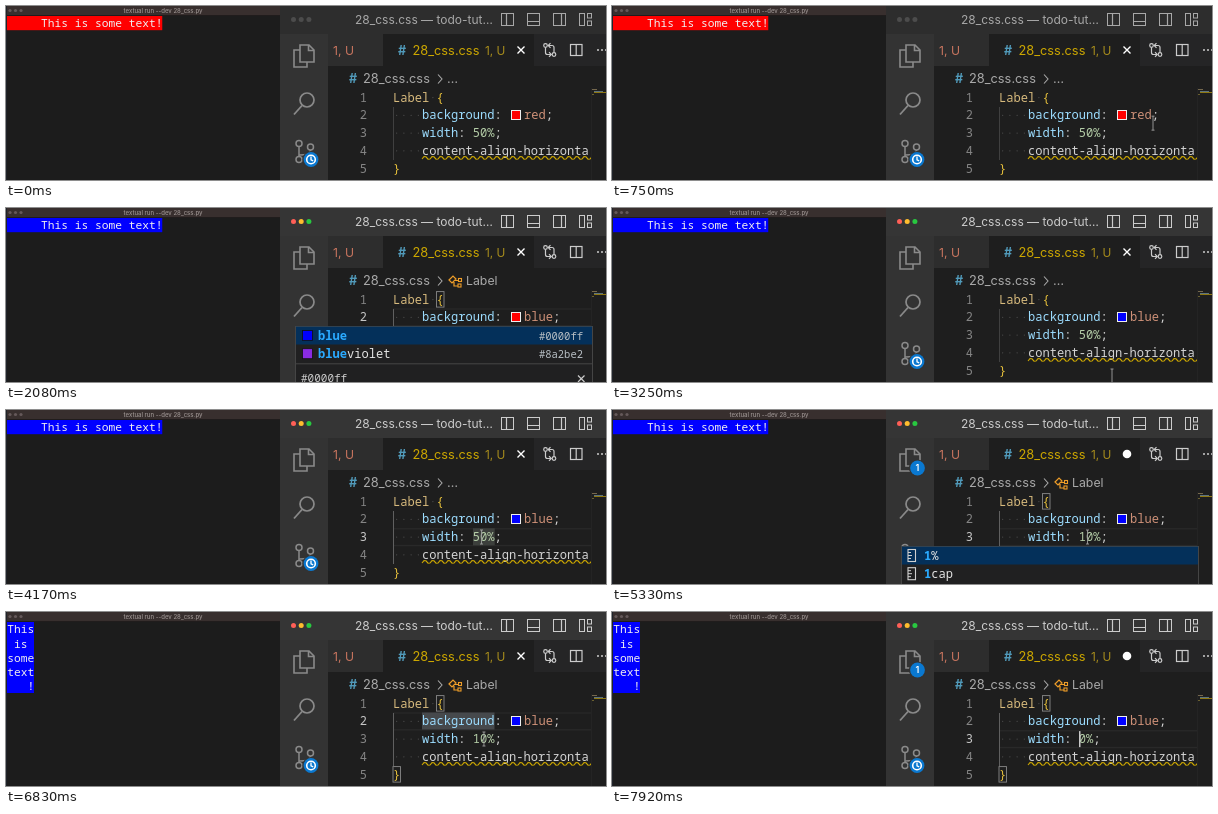
An HTML page with a canvas for the animation above (8 s loop, 600x174 px).

```html
<!DOCTYPE html>
<html lang="en">
<head>
<meta charset="utf-8">
<title>Live CSS editing</title>
<style>
html, body { margin: 0; width: 100%; height: 100%; overflow: hidden; background: #1c1c1c; }
canvas { display: block; width: 600px; height: 174px; }
</style>
</head>
<body>
<canvas id="stage"></canvas>
<script>
const LOOP = 8000, W = 600, H = 174;
const MONO = '"Noto Sans Mono", "DejaVu Sans Mono", monospace';
const SANS = 'Inter, "Open Sans", sans-serif';
const CHAR = 7.25, CODE_SIZE = 12.08, CODE_X = 387;
const CELL = 6.75, CELL_SIZE = 11.25, ROW = 14.2;
const stage = document.getElementById('stage');
const dpr = window.devicePixelRatio || 1;
stage.width = W * dpr;
stage.height = H * dpr;
const c = stage.getContext('2d');
c.scale(dpr, dpr);

function rect(x, y, w, h, fill) {
  c.fillStyle = fill;
  c.fillRect(x, y, w, h);
}
function frame(x, y, w, h, color, width = 1) {
  c.strokeStyle = color;
  c.lineWidth = width;
  c.strokeRect(x, y, w, h);
}
function disc(x, y, r, fill) {
  c.fillStyle = fill;
  c.beginPath();
  c.arc(x, y, r, 0, Math.PI * 2);
  c.fill();
}
function ring(x, y, r, color, width = 1.4) {
  c.strokeStyle = color;
  c.lineWidth = width;
  c.beginPath();
  c.arc(x, y, r, 0, Math.PI * 2);
  c.stroke();
}
function path(d, color, width = 1.2) {
  c.strokeStyle = color;
  c.lineWidth = width;
  c.stroke(new Path2D(d));
}
function text(s, x, y, size, color, family = SANS, weight = 400, align = 'left') {
  c.font = `${weight} ${size}px ${family}`;
  c.textAlign = align;
  c.fillStyle = color;
  c.fillText(s, x, y);
}
// Monospaced runs: text, colour, weight.
function runs(x, y, parts) {
  for (const [s, color, weight] of parts) {
    text(s, x, y, CODE_SIZE, color, MONO, weight);
    x += s.length * CHAR;
  }
}
const lineY = n => 95.6 + (n - 1) * 17.75;
const within = (t, a, b) => t >= a && t < b;
const latest = (t, steps) => steps.reduce((v, [at, next]) => t >= at ? next : v, null);

function stateAt(t) {
  return {
    focused: t >= 920,
    value: latest(t, [[0, 'red'], [1500, 'b'], [1590, 'bl'], [1670, 'blu'], [1750, 'blue']]),
    swatch: t < 2330 ? '#ff0000' : '#0000ff',
    width: latest(t, [[0, '50%'], [4750, '0%'], [5080, '10%'], [7750, '0%']]),
    label: t < 2000 ? '#ff0000' : '#0000ff',
    narrow: t >= 5920,
    dirty: within(t, 1500, 1920) || within(t, 4750, 5750) || t >= 7750,
    line: latest(t, [[0, 0], [1000, 2], [2750, 0], [4080, 3], [6330, 2], [7330, 3]]),
    crumb: within(t, 1080, 2920) || t >= 4250,
    braces: within(t, 1500, 2750) || t >= 4250,
    popup: within(t, 1580, 2580) ? 'color' : within(t, 5160, 6170) ? 'unit' : '',
    selected: within(t, 1080, 1500),
    word: within(t, 6330, 7330) ? 2 : within(t, 4080, 4750) || within(t, 7330, 7750) ? 3 : 0
  };
}

const mousePath = [[250, 541, 170], [900, 541, 109], [1500, 541, 109],
  [2750, 541, 109], [3100, 500, 168], [3500, 500, 168], [3950, 475.5, 127],
  [5900, 475.5, 127], [6250, 455, 109], [6450, 455, 109], [6750, 478, 127], [7750, 475, 127]];
function mouseAt(t) {
  if (t < 250 || within(t, 1500, 2750) || t >= 7750) return null;
  const i = mousePath.findIndex(p => p[0] > t);
  const [t0, x0, y0] = mousePath[i - 1], [t1, x1, y1] = mousePath[i];
  const u = (t - t0) / (t1 - t0), k = u * u * (3 - 2 * u);
  return [x0 + (x1 - x0) * k, y0 + (y1 - y0) * k];
}

function drawTerminal(s) {
  rect(0, 0, 274, H, '#1c1c1c');
  rect(0, 0, 274, 9, '#382f2e');
  rect(0, 9, 274, 1, '#201c1c');
  rect(0, 0, 1, H, '#20242b');
  [4, 9.5, 15].forEach(x => disc(x, 4.5, 1.6, '#65595a'));
  text('textual run --dev 28_css.py', 157, 7, 6, '#9b9290', SANS, 500, 'center');
  const rows = s.narrow ? ['This', ' is', 'some', 'text', '   !'] : ['     This is some text!'];
  rect(1, 10, (s.narrow ? 4 : 23) * CELL, rows.length * ROW, s.label);
  rows.forEach((row, i) => text(row, 1.3, 21.3 + i * ROW, CELL_SIZE, '#f0eef0', MONO));
}

function drawTitleBar(s) {
  rect(274, 0, 326, 28, s.focused ? '#353535' : '#2d2d2d');
  ['#ff5f57', '#febc2e', '#28c840'].forEach((color, i) =>
    disc(287.5 + i * 7.7, 13.5, 2.5, s.focused ? color : '#4c4c4c'));
  const ink = s.focused ? '#cccccc' : '#a8a8a8';
  text('28_css.css — todo-tut…', 349, 18.2, 12, ink);
  [495.5, 521.5, 547.5].forEach(x => frame(x, 7.5, 12, 12, ink));
  path('M500.5 7.5v12 M521.5 15.5h12 M555.5 7.5v12', ink);
  frame(573.5, 7.5, 5, 12, ink);
  frame(581.5, 7.5, 4, 4.5, ink);
  frame(581.5, 15, 4, 4.5, ink);
}

function badge(x, y) {
  disc(x, y, 8.6, '#333333');
  disc(x, y, 7.4, '#0a78d0');
}

function drawActivityBar(s) {
  rect(274, 28, 48, H - 28, '#333333');
  const ink = '#8a8a8a';
  path('M294 39h9l5 5v12h-14z M302.5 39v5.5h5.5 M294 44h-6v17h13v-5', ink, 1.6);
  ring(301, 94, 7, ink, 1.7);
  path('M296 99.5l-8 9', ink, 1.8);
  ring(293, 137.5, 3, ink, 1.5);
  ring(304.5, 141, 3, ink, 1.5);
  ring(293, 153.5, 3, ink, 1.5);
  path('M293 140.5v10 M304.5 144c0 4-4 5-11 5', ink, 1.5);
  badge(305, 153.5);
  ring(305, 153.5, 4.3, '#ffffff', 1.6);
  path('M305 150.5v3.3l2.2 1', '#ffffff', 1.3);
  if (s.dirty) {
    badge(305.5, 58);
    text('1', 305.5, 61.2, 9, '#ffffff', SANS, 600, 'center');
  }
}

function drawTabs(s) {
  rect(322, 28, 278, 32, '#252526');
  rect(322, 28, 55, 32, '#2d2d2d');
  rect(377, 28, 151, 32, '#1e1e1e');
  text('1, U', 327, 48.6, 12.2, '#c8755f');
  text('#', 392, 48.6, 12.5, '#519aba', SANS, 700);
  text('28_css.css', 406.5, 48.6, 12.8, '#cca700');
  text('1, U', 479, 48.6, 11.8, '#a88d1c');
  const ink = '#cccccc';
  if (s.dirty) disc(515, 44, 4.3, '#ffffff');
  else path('M511.5 40.5l7 7 M518.5 40.5l-7 7', '#ffffff', 1.4);
  ring(539.5, 39.5, 1.8, ink, 1.2);
  ring(548, 48.5, 1.8, ink, 1.2);
  path('M539.5 41.5v5q0 2 2 2h3.5 M543 46.2l2.3 2.3-2.3 2.3 M548 46.5v-5q0-2-2-2h-3.5 M544.5 37.2l-2.3 2.3 2.3 2.3', ink);
  frame(564.5, 38.5, 11.5, 11, ink, 1.2);
  path('M570.2 38.5v11', ink);
  [592, 596, 600].forEach(x => disc(x, 44, 1, ink));
}

function drawBreadcrumb(s) {
  const ink = '#a9a9a9';
  text('#', 343, 77.4, 12.5, '#519aba', SANS, 700);
  text('28_css.css', 357, 77.4, 12.8, ink);
  path('M432 68.5l4 4.5-4 4.5', ink, 1.1);
  if (!s.crumb) {
    text('…', 441, 77.4, 12.8, ink);
    return;
  }
  const orange = '#ee9d28';
  path('M443 72l4-4 3 3-4 4z M449 72.5h4 M448 74v4h4', orange, 1.2);
  frame(452.5, 70.5, 3, 3, orange, 1.1);
  frame(452, 76, 3, 3, orange, 1.1);
  text('Label', 460, 77.4, 12.3, ink);
}

function drawCode(s) {
  rect(322, 60, 278, H - 60, '#1e1e1e');
  drawBreadcrumb(s);
  if (s.line) {
    const y = lineY(s.line) - 13;
    rect(CODE_X, y, 198, 1.3, '#292929');
    rect(CODE_X, y + 16.8, 198, 1.3, '#292929');
  }
  rect(CODE_X, 101, 1, 53, s.line ? '#606060' : '#404040');
  for (let n = 1; n <= 5; n++) {
    text(n, 361, lineY(n), CODE_SIZE, n === s.line ? '#c6c6c6' : '#858585', MONO, 400, 'right');
  }
  if (s.selected) rect(507, 100.5, 33, 17, '#264f78');
  if (s.word === 2) rect(416, 100.5, 72.5, 17, '#46494c');
  if (s.word === 3) rect(467, 118.3, s.width.length * CHAR, 17, '#3c3f3c');
  if (s.braces) {
    for (const [x, n] of [[430.5, 1], [387, 5]]) {
      frame(x, lineY(n) - 12, 7.5, 15.5, '#888888', 0.9);
    }
  }
  for (let n = 2; n <= 4; n++) {
    for (let i = 0; i < 4; i++) disc(CODE_X + (i + 0.5) * CHAR, lineY(n) - 4, 0.7, '#4b4b4b');
  }
  disc(CODE_X + 5.5 * CHAR, lineY(1) - 4, 0.7, '#4b4b4b');
  const plain = '#d4d4d4', prop = '#9cdcfe', gold = '#e6c03c', indent = CODE_X + 4 * CHAR;
  runs(CODE_X, lineY(1), [['Label ', '#d7ba7d'], ['{', gold]]);
  runs(indent, lineY(2), [['background', prop], [':', plain]]);
  rect(505.5, 104.5, 9, 9, s.swatch);
  frame(505.5, 104.5, 9, 9, '#eeeeee', 1);
  runs(518, lineY(2), [[s.value, '#ce9178'], [';', plain]]);
  runs(indent, lineY(3), [['width', prop], [': ', plain], [s.width, '#b5cea8'], [';', plain]]);
  c.save();
  c.beginPath();
  c.rect(CODE_X, 60, 198, H - 60);
  c.clip();
  runs(indent, lineY(4), [['content-align-horizonta', plain]]);
  let wave = 'M416 153';
  for (let i = 0; i < 43; i++) wave += `l2 ${i % 2 ? 2.4 : -2.4}l2 ${i % 2 ? -0.2 : 0.2}`;
  path(wave, '#cca700', 1.1);
  c.restore();
  runs(CODE_X, lineY(5), [['}', gold]]);
  rect(585, 82, 1, H - 82, '#242424');
  rect(586, 83, 5, 1, '#75684d');
  rect(588, 85, 9, 1, '#5d747f');
  rect(588, 86, 12, 1, '#8f7812');
  rect(586, 88, 2, 1, '#6a602f');
}

function drawCaret(s, t) {
  if (!s.line || s.line === 2 && t > 6330) return;
  const typing = within(t, 1500, 1800) || within(t, 4750, 5250) || t >= 7750;
  if (!typing && t % 1000 < 500) return;
  const x = s.line === 2 ? 518 + s.value.length * CHAR : 467 + (s.width.length - 2) * CHAR;
  rect(x, lineY(s.line) - 12, 1.5, 16, '#c8c8c8');
}

function drawMouse(t) {
  const p = mouseAt(t);
  if (!p) return;
  const [x, y] = p;
  path(`M${x} ${y - 7}v14 M${x - 1.5} ${y - 7}h3 M${x - 1.5} ${y + 7}h3`, '#a0a0a0', 0.9);
}

function drawPopup(s) {
  if (!s.popup) return;
  const colors = s.popup === 'color', top = colors ? 118 : 136, width = 298;
  const typed = colors ? s.value : '1';
  const items = colors
    ? [['blue', '#0000ff'], ['blueviolet', '#8a2be2']]
    : [['1%'], ['1cap']];
  rect(289, top, width, H - top, '#202021');
  rect(289, top, width, 18.5, '#04305a');
  rect(289, top, 1, H - top, '#454545');
  rect(288 + width, top, 1, H - top, '#454545');
  rect(289, top, width, 0.8, '#3b4650');
  items.forEach(([name, hex], i) => {
    const y = top + i * 18.2, base = y + 13.8;
    if (hex) {
      rect(296.5, y + 4.5, 10, 10, hex);
      frame(296.5, y + 4.5, 10, 10, '#111111', 0.8);
      text(hex, 577, base, 10.5, '#b7bec4', MONO, 400, 'right');
    } else {
      frame(296, y + 3.5, 7.5, 12, '#d0d0d0', 1.1);
      path(`M296 ${y + 6.5}h3 M296 ${y + 9.5}h4 M296 ${y + 12.5}h3`, '#d0d0d0', 1);
    }
    runs(312, base, [[typed, '#2aaaff', 700], [name.slice(typed.length), '#e4e4e4']]);
  });
  if (colors) {
    rect(290, 155.3, width - 2, 1, '#454545');
    text('#0000ff', 295, 174, 11, '#cccccc', MONO);
    path('M572 167.5l6.5 6.5 M578.5 167.5l-6.5 6.5', '#cccccc', 1.2);
  }
}

function draw(now) {
  const t = now % LOOP, s = stateAt(t);
  drawTerminal(s);
  drawCode(s);
  drawTitleBar(s);
  drawTabs(s);
  drawActivityBar(s);
  drawCaret(s, t);
  drawPopup(s);
  drawMouse(t);
  requestAnimationFrame(draw);
}
requestAnimationFrame(draw);
</script>
</body>
</html>
```
